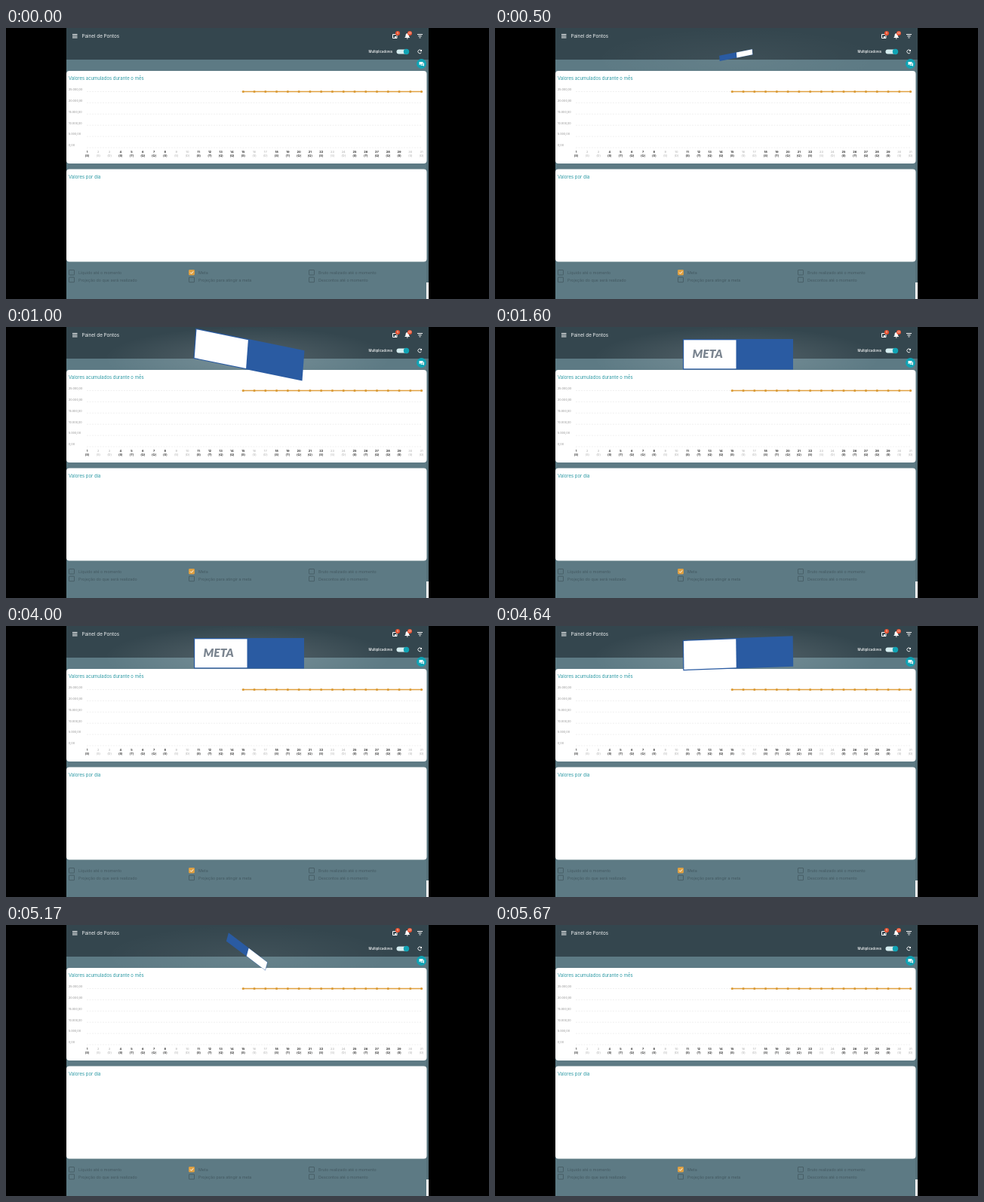
These frames come from a looping animation (640x360 px, 5770 ms). An HTML page:

```html
<!DOCTYPE html>
<html lang="pt">
<head>
<meta charset="utf-8">
<title>Painel de Pontos</title>
<style>
  html, body { margin: 0; width: 100%; height: 100%; overflow: hidden; background: #000; }
  svg { display: block; width: 100%; height: 100%; }
  text { font-family: Inter, "Open Sans", sans-serif; }
  .title { font-size: 6px; fill: #2a98a3; }
  .axis { font-size: 3.8px; fill: #8d8d8d; }
  .day { font-size: 4px; font-weight: 600; text-anchor: middle; fill: #222; }
  .off { font-weight: 400; fill: #aaa; }
  .option { font-size: 5.3px; fill: #435860; }
  .badge { font-size: 3.4px; fill: #fff; text-anchor: middle; }
  .label { font: italic 900 15.5px Lato, "Open Sans", sans-serif; fill: #7b8590; }
</style>
</head>
<body>
<svg viewBox="0 0 640 360">
  <defs>
    <clipPath id="panel"><rect x="80" width="480" height="360"/></clipPath>
    <radialGradient id="light">
      <stop offset="0" stop-color="#fff" stop-opacity=".16"/>
      <stop offset="1" stop-color="#fff" stop-opacity="0"/>
    </radialGradient>
  </defs>
  <rect width="640" height="360"/>
  <g clip-path="url(#panel)">
    <rect x="80" width="480" height="360" fill="#5d7a84"/>
    <rect x="80" width="480" height="42" fill="#34464e"/>
    <ellipse id="glow" cx="320" cy="42" rx="190" ry="42" fill="url(#light)"/>
    <rect x="557.5" y="42" width="2.5" height="318" fill="#536d76"/>
    <rect x="557" y="338" width="3" height="22" fill="#fff"/>

    <path d="M88 8.5h6.5M88 10.7h6.5M88 12.9h6.5" stroke="#fff" stroke-width="1"/>
    <text x="100.500" y="12.800" font-size="6.3" fill="#f0f3f4">Painel de Pontos</text>
    <path d="M512.500 8.500h5.500v5h-5.500z" fill="none" stroke="#fff"/>
    <path d="M515 11h2v2h-2z" fill="#fff"/>
    <path d="M528.500 13v-.8l1-1v-2q.2-2 2.200-2.300 2 .3 2.200 2.300v2l1 1v.8zM531 13.500h1.500v1h-1.500z" fill="#fff"/>
    <g fill="#e8502f"><circle cx="519" cy="7" r="3"/><circle cx="535" cy="7" r="3"/></g>
    <text class="badge" x="519" y="8.200">5</text>
    <text class="badge" x="535" y="8.200">43</text>
    <path d="M545 8.500h7M546.300 10.700h4.400M547.500 12.900h2" stroke="#fff"/>

    <text x="480.500" y="33.200" font-size="4.300" font-weight="500" fill="#fff">Multiplicadores</text>
    <rect x="517.500" y="28.500" width="15" height="6" rx="3" fill="#d5edf0"/>
    <circle cx="530.500" cy="31.500" r="3.700" fill="#10a3b4"/>
    <path d="M550.300 30a2.400 2.400 0 1 0 .1 2.500" fill="none" stroke="#fff" stroke-width=".9"/>
    <path d="M551 28.500v2.600h-2.600z" fill="#fff"/>

    <rect x="80" y="57" width="477.500" height="123" rx="4" fill="#fff"/>
    <rect x="80" y="187.500" width="477.500" height="123" rx="4" fill="#fff"/>
    <circle cx="550.500" cy="47.500" r="6.500" fill="#10a3b4"/>
    <path d="M547.500 45h5v3.500h-4l-1 1zM549.500 49.300h3.500v-2.800h1v4.500l-1-1h-3.500z" fill="#fff"/>
    <text class="title" x="83" y="69.300">Valores acumulados durante o mês</text>
    <text class="title" x="83" y="199.800">Valores por dia</text>
    <g id="chart"></g>
    <g id="options"></g>

    <g id="banner">
      <rect x="-71" y="-20" width="146" height="40.500" fill="#2a5ba2"/>
      <rect x="-69.800" y="-18.700" width="69.300" height="38" fill="#fff"/>
      <text id="label" class="label" x="-58.500" y="5.300">META</text>
    </g>
  </g>
</svg>
<script>
  const $ = id => document.getElementById(id);

  function add(parent, tag, attrs, text = '') {
    const node = document.createElementNS('http://www.w3.org/2000/svg', tag);
    for (const name in attrs) node.setAttribute(name, attrs[name]);
    node.textContent = text;
    parent.append(node);
  }

  function buildChart() {
    const chart = $('chart');
    const dayX = day => 107.5 + (day - 1) * 14.77;
    ['25.000,00', '20.000,00', '15.000,00', '10.000,00', '5.000,00', '0,00'].forEach((value, i) => {
      const y = 84.5 + i * 14.9;
      add(chart, 'text', { class: 'axis', x: 83, y: y - 1.7 }, value);
      add(chart, 'path', { d: `M107 ${y}H551`, stroke: '#e6e6e6', 'stroke-width': .6, 'stroke-dasharray': '2 1.5' });
    });
    add(chart, 'path', { d: `M${dayX(15)} 84.5H${dayX(31)}`, stroke: '#e0a040', 'stroke-width': 1.4 });
    for (let day = 1; day <= 31; day++) {
      const weekday = (day - 1) % 7;
      const style = weekday === 1 || weekday === 2 ? 'day off' : 'day';
      add(chart, 'text', { class: style, x: dayX(day), y: 165.8 }, day);
      add(chart, 'text', { class: style, x: dayX(day), y: 171.3 }, `(${'SSDSTQQ'[weekday]})`);
      if (day >= 15) add(chart, 'circle', { cx: dayX(day), cy: 84.5, r: 1.6, fill: '#d99a35' });
    }
  }

  function buildOptions() {
    const names = [
      'Líquido até o momento', 'Projeção do que será realizado',
      'Meta', 'Projeção para atingir a meta',
      'Bruto realizado até o momento', 'Descontos até o momento'
    ];
    names.forEach((name, i) => {
      const x = 83.5 + (i >> 1) * 159, y = 321.5 + (i % 2) * 9.7, checked = name === 'Meta';
      add($('options'), 'rect', {
        x, y, width: 7, height: 6.5, rx: .5, 'stroke-width': .8,
        fill: checked ? '#e0a040' : 'none', stroke: checked ? '#e0a040' : '#435860'
      });
      if (checked) add($('options'), 'path', { d: `M${x + 1.5} ${y + 3.2}l1.6 1.6 2.6-3`, fill: 'none', stroke: '#fff' });
      add($('options'), 'text', { class: 'option', x: x + 12.5, y: y + 5.4 }, name);
    });
  }

  const LOOP = 5770, SPIN = 1080, STRETCH = 1.67;
  const clamp = v => Math.min(1, Math.max(0, v));
  const easeInOut = (p, power) => p < .5 ? (2 * p) ** power / 2 : 1 - (2 - 2 * p) ** power / 2;

  function draw(t) {
    const entering = t < 2800;
    // 0 at rest, 1 fully spun away
    const away = clamp(entering ? (1124 - t) / SPIN : (t - 4588) / SPIN);
    const angle = (entering ? 270 : -270) * easeInOut(away, 2);
    const width = 1 - easeInOut(away, 3), height = 1 - easeInOut(away, 6);
    const banner = $('banner');
    banner.style.display = away < 1 ? '' : 'none';
    banner.setAttribute('transform',
      `translate(320 36) scale(1 ${STRETCH}) rotate(${angle}) scale(${width} ${height / STRETCH})`);
    $('label').style.opacity = clamp(entering ? (t - 1150) / 430 : (4570 - t) / 550);
    $('glow').style.opacity = width;
  }

  function tick() {
    draw(performance.now() % LOOP);
    requestAnimationFrame(tick);
  }

  buildChart();
  buildOptions();
  tick();
</script>
</body>
</html>
```
